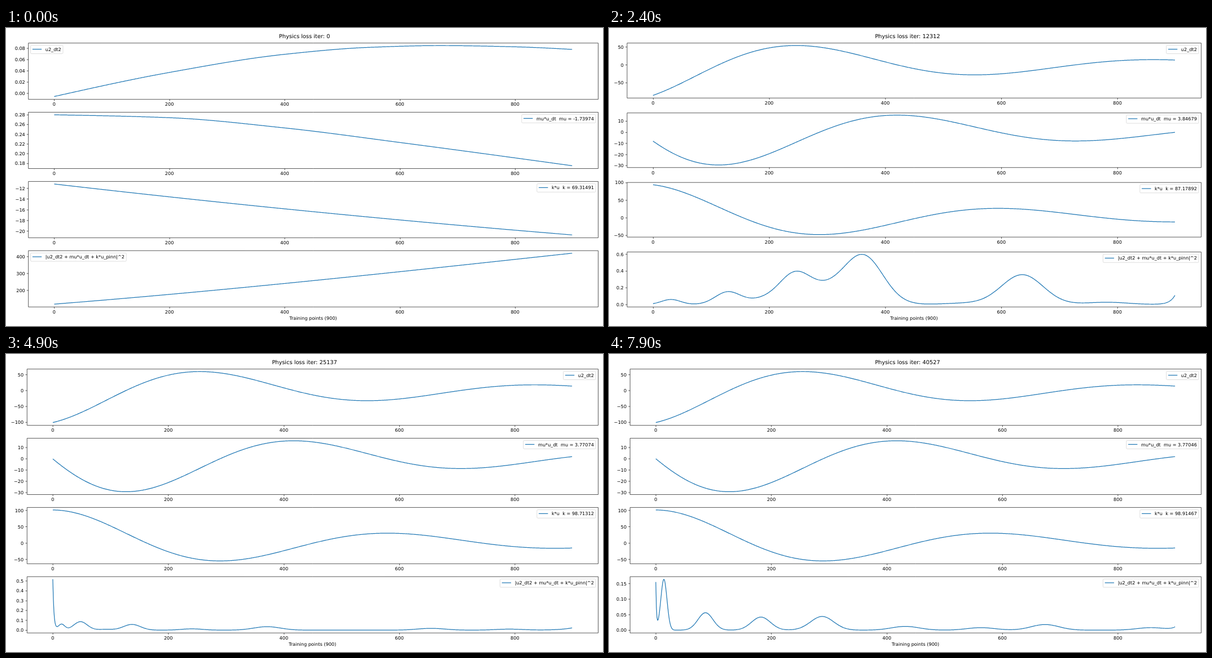
These frames come from a looping animation (1058x529 px, 8000 ms). An HTML page with a canvas:

```html
<!DOCTYPE html>
<html lang="en">
<head>
<meta charset="utf-8">
<title>Physics loss</title>
<style>
html, body { margin: 0; width: 100%; height: 100%; overflow: hidden; background: #fff; }
canvas { display: block; width: 1058px; height: 529px; }
</style>
</head>
<body>
<canvas id="stage" width="1058" height="529"></canvas>
<script>
const ctx = document.getElementById('stage').getContext('2d');
const W = 1058, H = 529, FRAMES = 80, STEP_MS = 100, ITERS = 513, POINTS = 900;
const PT = W / 18 / 72, GRID = W / 1800;
const PAD = 10.8 * PT, RIGHT = W - PAD, TOP = 26.7, BOTTOM = 494.7, GAP = 23.4;
const BLUE = '#1f77b4';

// Monotone cubic through x, y pairs.
function curve(...p) {
  const xs = p.filter((_, i) => i % 2 === 0), ys = p.filter((_, i) => i % 2);
  const n = xs.length, h = [], s = [], m = [];
  for (let i = 0; i < n - 1; i++) {
    h[i] = xs[i + 1] - xs[i];
    s[i] = (ys[i + 1] - ys[i]) / h[i];
  }
  for (let i = 1; i < n - 1; i++) {
    const a = 2 * h[i] + h[i - 1], b = h[i] + 2 * h[i - 1];
    m[i] = s[i - 1] * s[i] <= 0 ? 0 : (a + b) / (a / s[i - 1] + b / s[i]);
  }
  m[0] = 1.5 * s[0] - 0.5 * m[1];
  m[n - 1] = 1.5 * s[n - 2] - 0.5 * m[n - 2];
  return x => {
    let i = 0;
    while (i < n - 2 && x > xs[i + 1]) i++;
    const t = (x - xs[i]) / h[i], u = 1 - t;
    return ys[i] * u * u * (1 + 2 * t) + ys[i + 1] * t * t * (3 - 2 * t)
      + h[i] * t * u * (m[i] * u - m[i + 1] * t);
  };
}

const sample = f => Array.from({ length: POINTS }, (_, x) => f(x));
const mix = (a, b, t) => a + (b - a) * t;

// Learned coefficients over the frame index.
const KEYS = [0, 15, 24, 38, 49, 61, 79];
const track = (...v) => curve(...v.flatMap((y, i) => [KEYS[i], y]));
const mu = track(-1.73974, 4.05365, 3.84679, 3.76677, 3.77074, 3.77102, 3.77046);
const k = track(69.31491, 79.98949, 87.17892, 96.44153, 98.71312, 98.87155, 98.91467);

// Untrained network output.
const untrained = [
  curve(0, -0.0058, 200, 0.037, 400, 0.0692, 550, 0.0817, 670, 0.0847, 800, 0.0825, 899, 0.0779),
  curve(0, 0.28, 200, 0.274, 400, 0.2529, 600, 0.2229, 899, 0.175),
  x => -11.19 - 11.2 * (x / POINTS) + 1.66 * (x / POINTS) ** 2
].map(sample);

// Residual as bell-shaped ripples that widen to the right, plus exponential edges.
function ripples({ spread = 1, start = [0, 1], end = [0, 1], at }) {
  const width = c => spread * Math.min(0.38 * c, 10 + 0.035 * c, 24);
  return sample(x => {
    let sum = start[0] * Math.exp(-x / start[1]) + end[0] * Math.exp((x - POINTS + 1) / end[1]);
    for (const [c, height] of at) sum += height * Math.exp(-0.5 * ((x - c) / width(c)) ** 2);
    return sum;
  });
}

const residuals = [
  sample(x => (untrained[0][x] + untrained[1][x] + untrained[2][x]) ** 2),
  ripples({ spread: 2, at: [[24, 1.6], [68, .6], [115, 2.2], [178, 1.4], [248, 3.8], [298, .5],
    [350, 4.75], [420, 1.4], [545, .5], [870, .13]] }),
  ripples({ spread: 1.5, end: [.11, 9], at: [[31, .06], [129, .15], [185, .05], [244, .36],
    [298, .14], [362, .58], [535, .015], [636, .355], [782, .027]] }),
  ripples({ start: [.32, 1.8], end: [.044, 14], at: [[14, .03], [47, .062], [136, .07],
    [243, .058], [373, .117], [535, .009], [635, .038], [852, .012]] }),
  ripples({ start: [.515, 1.9], end: [.023, 20], at: [[15, .06], [48, .086], [90, .008],
    [137, .058], [241, .013], [371, .035], [655, .018], [790, .01]] }),
  ripples({ spread: 1.35, start: [1.6, 4], at: [[45, .57], [90, .1], [134, .44], [232, .05],
    [358, .035], [450, .035], [585, .23], [640, .13], [690, .2], [740, .13], [795, .32],
    [855, .25], [925, .96]] }),
  ripples({ start: [.15, 1.2], end: [.009, 8], at: [[14, .164], [86, .056], [182, .042],
    [288, .044], [432, .012], [563, .008], [674, .018], [857, .008]] })
];
const peaks = residuals.map(r => Math.max(...r));

// Shape blends linearly, scale geometrically.
function residualAt(frame) {
  let j = 0;
  while (j < KEYS.length - 2 && frame > KEYS[j + 1]) j++;
  const t = (frame - KEYS[j]) / (KEYS[j + 1] - KEYS[j]);
  const scale = peaks[j] ** (1 - t) * peaks[j + 1] ** t;
  return sample(x => scale * mix(residuals[j][x] / peaks[j], residuals[j + 1][x] / peaks[j + 1], t));
}

// Damped oscillator; its phase error shrinks as k converges.
function seriesAt(frame) {
  const m = mu(frame), stiff = k(frame), phase = 0.018 * (98.9 - stiff);
  const d = m / 2, w = Math.sqrt(stiff - d * d) + 0.28 * phase;
  const r = Math.hypot(d, w), delta = Math.atan2(d, w);
  const amp = 1.038 + 0.115 * phase, offset = 4.5 * phase;
  const s = Math.min(1, frame / 7), learned = s * s * (3 - 2 * s);
  const terms = [
    p => -r * r * Math.cos(p + delta),
    p => -m * r * Math.sin(p),
    p => stiff * Math.cos(p - delta)
  ];
  const series = terms.map((f, i) => sample(x => {
    const t = x / POINTS;
    const value = amp * Math.exp(-d * t) * f(w * t + phase) + (i === 2 ? offset : 0);
    return mix(untrained[i][x], value, learned);
  }));
  return [...series, residualAt(frame)];
}

function limits(values) {
  const lo = Math.min(...values), hi = Math.max(...values), margin = (hi - lo) * 0.05;
  return [lo - margin, hi + margin];
}

function ticks([lo, hi], bins) {
  const raw = (hi - lo) / bins, base = 10 ** Math.floor(Math.log10(raw));
  const step = base * [1, 2, 2.5, 5, 10].find(s => s * base >= raw * 0.999999);
  let digits = 0;
  while (digits < 6 && Math.abs(step * 10 ** digits - Math.round(step * 10 ** digits)) > 1e-6) digits++;
  const out = [];
  for (let i = Math.ceil(lo / step); i * step <= hi; i++) {
    const label = Math.abs(i * step).toFixed(digits);
    out.push({ value: i * step, label: (i < 0 ? '\u2212' : '') + label });
  }
  return out;
}

// Thin lines sit on the cells of a finer pixel grid.
const snap = (v, shift = 0.5) => (Math.floor(v / GRID + 0.5) + shift) * GRID;

function setFont(points) {
  ctx.font = `${points * PT}px "DejaVu Sans", sans-serif`;
}

function text(str, x, y, align = 'left') {
  ctx.fillStyle = '#000';
  ctx.textAlign = align;
  ctx.fillText(str, x, y);
}

function line(x1, y1, x2, y2) {
  ctx.beginPath();
  ctx.moveTo(x1, y1);
  ctx.lineTo(x2, y2);
  ctx.stroke();
}

// Margins follow the labels of a coarser, five-bin tick pass.
function layout(ranges) {
  let widest = 0;
  const over = ranges.map(range => {
    const list = ticks(range, 5);
    for (const t of list) widest = Math.max(widest, ctx.measureText(t.label).width);
    const last = list[list.length - 1].value;
    return Math.max(0, 3.2 - (range[1] - last) / (range[1] - range[0]) * 88.5);
  });
  const top = TOP + over[0], gap = GAP + Math.max(...over.slice(1));
  return { left: PAD + widest + 7 * PT, top, gap, height: (BOTTOM - top - 3 * gap) / 4 };
}

function legend(label, left, top, pixels) {
  const w = ctx.measureText(label).width + 36 * PT, h = 14.8, y = top + 5 * PT;
  let x = RIGHT - 5 * PT - w;
  if (pixels.some(([px, py]) => px > x && px < x + w && py > y && py < y + h)) x = left + 5 * PT;
  ctx.beginPath();
  ctx.roundRect(x, y, w, h, 2 * PT);
  ctx.fillStyle = 'rgba(255,255,255,0.8)';
  ctx.fill();
  ctx.strokeStyle = 'rgba(204,204,204,0.8)';
  ctx.lineWidth = PT;
  ctx.stroke();
  ctx.strokeStyle = BLUE;
  ctx.lineWidth = 1.5 * PT;
  const mid = snap(y + 7, 0);
  line(x + 4 * PT, mid, x + 24 * PT, mid);
  text(label, x + 32 * PT, y + 10);
}

function plot(values, range, label, box, top) {
  const { left, height } = box, bottom = top + height;
  const toX = v => left + (v / (POINTS - 1) + 0.05) / 1.1 * (RIGHT - left);
  const toY = v => bottom - (v - range[0]) / (range[1] - range[0]) * height;
  const tick = 3.5 * PT;

  const pixels = values.map((v, x) => [toX(x), toY(v)]);
  ctx.beginPath();
  pixels.forEach(([x, y]) => ctx.lineTo(x, y));
  ctx.strokeStyle = BLUE;
  ctx.lineWidth = 1.5 * PT;
  ctx.lineJoin = 'round';
  ctx.stroke();

  const x0 = snap(left), y0 = snap(top), y1 = snap(bottom);
  ctx.strokeStyle = '#000';
  ctx.lineWidth = 0.8 * PT;
  ctx.strokeRect(x0, y0, snap(RIGHT) - x0, y1 - y0);
  for (let v = 0; v <= 800; v += 200) {
    const x = snap(toX(v));
    line(x, y1, x, y1 + tick);
    text(v, toX(v), bottom + 12.2, 'center');
  }
  for (const t of ticks(range, 6)) {
    const y = snap(toY(t.value));
    line(x0 - tick, y, x0, y);
    text(t.label, left - 2 * tick, toY(t.value) + 3.2, 'right');
  }
  legend(label, left, top, pixels);
}

function draw(frame) {
  ctx.fillStyle = '#fff';
  ctx.fillRect(0, 0, W, H);
  ctx.textRendering = 'geometricPrecision';
  setFont(12);
  text(`Physics loss iter: ${frame * ITERS}`, W / 2, 18, 'center');
  setFont(10);
  const series = seriesAt(frame), ranges = series.map(limits), box = layout(ranges);
  const labels = [
    'u2_dt2',
    `mu*u_dt  mu = ${mu(frame).toFixed(5)}`,
    `k*u  k = ${k(frame).toFixed(5)}`,
    '|u2_dt2 + mu*u_dt + k*u_pinn|^2'
  ];
  series.forEach((values, i) =>
    plot(values, ranges[i], labels[i], box, box.top + i * (box.height + box.gap)));
  text('Training points (900)', (box.left + RIGHT) / 2, 518.4, 'center');
}

let shown = -1;
function loop() {
  const frame = Math.floor(performance.now() / STEP_MS) % FRAMES;
  if (frame !== shown) draw(shown = frame);
  requestAnimationFrame(loop);
}
loop();
</script>
</body>
</html>
```
